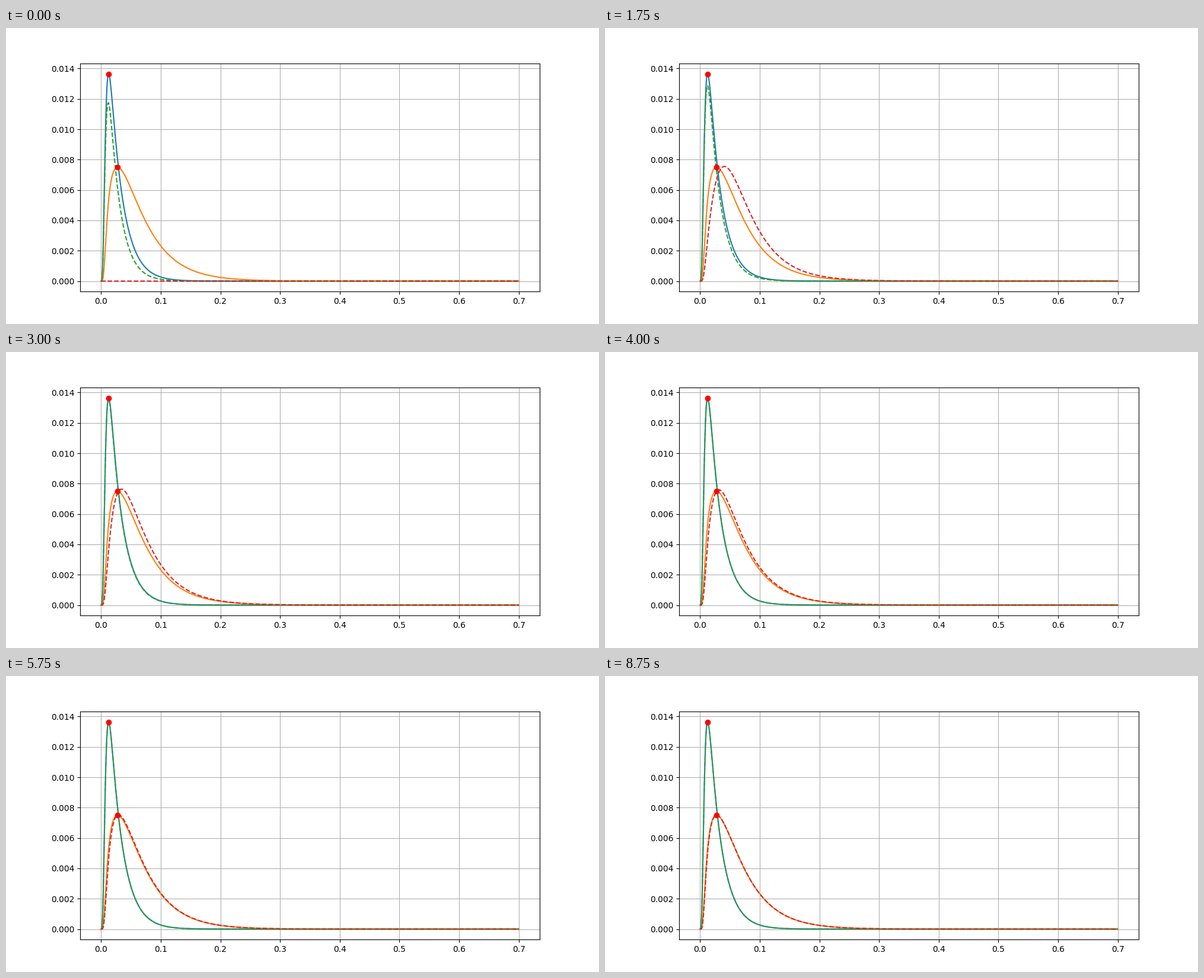
A matplotlib script for the animation above (9 s loop, 1000 px wide and 500 px high).

```python
import numpy as np
import matplotlib.pyplot as plt
from matplotlib.animation import FuncAnimation

FRAMES, INTERVAL = 36, 250
FAST_PEAK, SLOW_PEAK = 0.013647, 0.0075

t = np.linspace(0, 0.7, 2801)


def scaled(y, peak):
    return peak * y / y[np.abs(y).argmax()]


def onset(rate):
    return (1 - np.exp(-rate * t)) ** 5


def fast(peak, decay):
    return scaled(np.exp(-decay * t) * onset(265), peak)


def slow(peak, lag=1):
    return scaled(np.exp(-23 * t) * (1 - np.exp(-32 * t)) * onset(290) * lag, peak)


def fast_fit(n):
    gap = 0.0019 * (1 + 0.64 * n**2) * np.exp(-n / 1.6)
    return fast(FAST_PEAK - gap, 47 + 4000 * gap)


def slow_fit(n):
    """Zero at first, then a lagging pulse whose lag shrinks every step."""
    if n == 0:
        return np.zeros_like(t)
    peak = SLOW_PEAK + 0.00035 * (n - 6.3) * np.exp(-n / 4.5)
    rate = 7 * n - 14.5
    return slow(peak, 1 - np.exp(-rate * t))


fig, ax = plt.subplots(figsize=(10, 5), dpi=100)
curves = [fast(FAST_PEAK, 47), slow(SLOW_PEAK)]
for y in curves:
    ax.plot(t, y)
fast_line, = ax.plot(t, fast_fit(0), "--")
slow_line, = ax.plot(t, slow_fit(0), "--")
for y in curves:
    top = y.argmax()
    ax.plot(t[top], y[top], "ro")

ax.grid(True)
ax.set_xlim(-0.035, 0.735)
ax.set_ylim(-0.05 * FAST_PEAK, 1.05 * FAST_PEAK)


def update(n):
    fast_line.set_ydata(fast_fit(n))
    slow_line.set_ydata(slow_fit(n))
    return fast_line, slow_line


anim = FuncAnimation(fig, update, frames=FRAMES, interval=INTERVAL,
                     init_func=lambda: update(0), repeat=True, repeat_delay=0)
plt.show()
```
